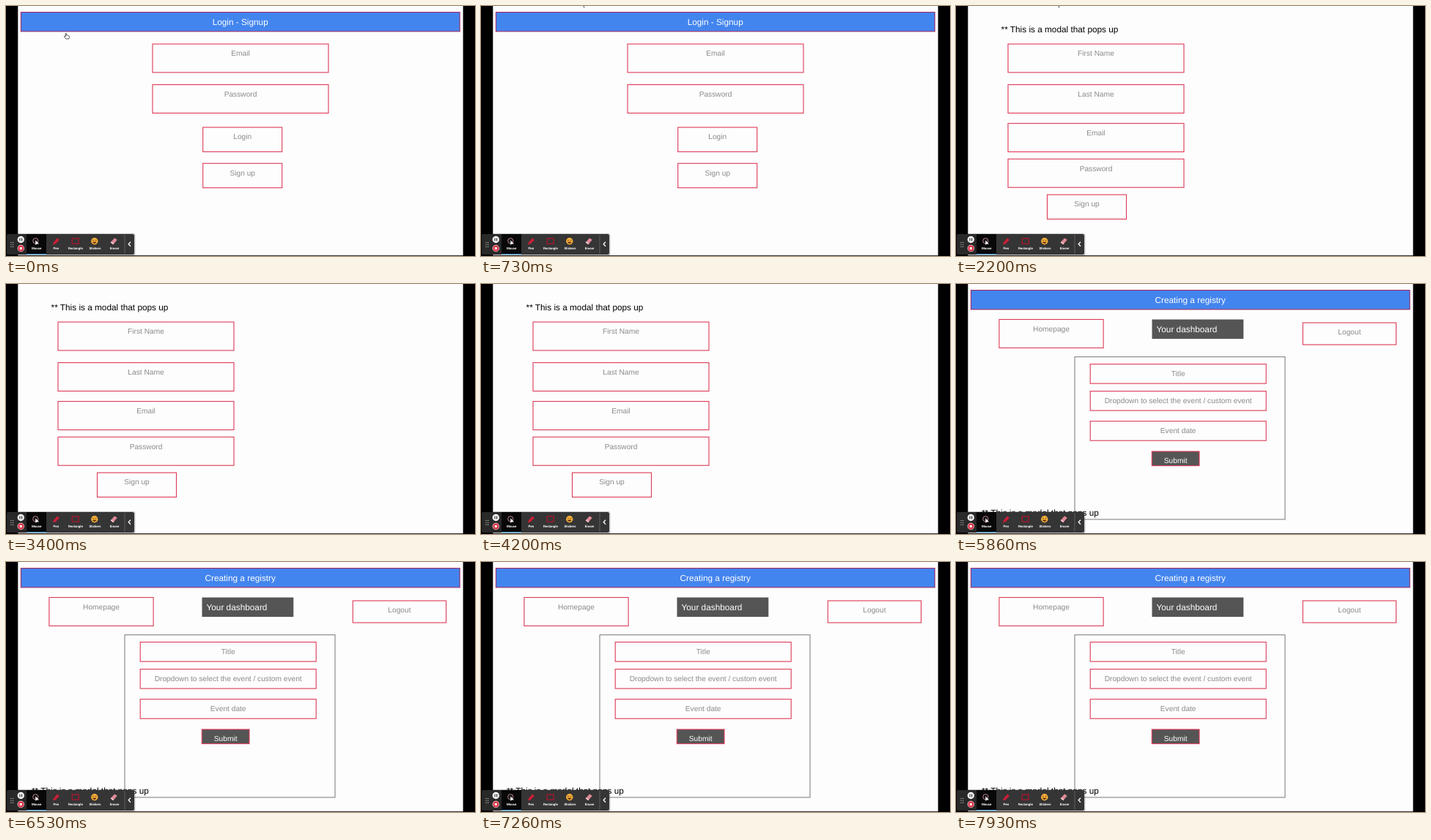
These frames come from a looping animation (640 px wide and 342 px high, 8000 ms). An HTML page:

```html
<!DOCTYPE html>
<html lang="en">
<head>
<meta charset="utf-8">
<style>
html, body { margin: 0; width: 100%; height: 100%; overflow: hidden; background: #000; }
svg { display: block; width: 640px; height: 342px; font-family: "Liberation Sans", Arial, sans-serif; text-rendering: geometricPrecision; }
.box { fill: none; stroke: #dc3a57; stroke-width: 1.1; }
.label { font-size: 10.2px; fill: #8b8b8b; text-anchor: middle; }
.big { font-size: 11.8px; }
.tool { font: bold 4.4px Roboto, sans-serif; fill: #fff; text-anchor: middle; }
</style>
</head>
<body>
<svg viewBox="0 0 640 342">
  <rect x="16.3" width="607.4" height="341.2" fill="#fdfdfd"/>
  <g id="slides"></g>
  <g id="hand" fill="#fff" stroke="#333" stroke-width=".8" stroke-linejoin="round">
    <path d="M-1.8 1V-3.3Q-1.2 -4.3-.6 -3.3V-.9Q.4-1.6 1-.7 2-1.1 2.3-.3 3.4-.5 3.4.6V2.2L2.5 4H-1.2L-3.6.9Q-3.6-.3-2.5.3Z"/>
  </g>
  <path id="arrow" d="M136.5-9V.3L138.5-1.4 140.1 2.9 142 2.2 140.4-2H143.2Z" fill="#777" stroke="#fff" stroke-width=".6"/>

  <g id="toolbar">
    <rect x="0" y="311" width="176.5" height="31" rx="3" fill="#000" opacity=".22"/>
    <rect x="1" y="312" width="174" height="28" rx="2.5" fill="#353535"/>
    <path d="M3.5 312H28V340H3.5Q1 340 1 337.5V314.5Q1 312 3.5 312Z" fill="#292929"/>
    <path d="M28 312H55V340H28Z" fill="#080808"/>
    <path d="M28 339H55V340H28Z" fill="#3a9fdc"/>
    <path d="M7 323V330M9.6 323V330" stroke="#bbb" stroke-width="1.2" stroke-dasharray="1.2 1.7"/>
    <circle cx="20.3" cy="319.5" r="4.7" fill="#f4f4f4"/>
    <path d="M19 317.5V321.5M21.6 317.5V321.5" stroke="#222" stroke-width="1.1"/>
    <circle cx="20.3" cy="331.5" r="4.7" fill="#f1d5d8"/>
    <circle cx="20.3" cy="331.5" r="3.9" fill="#d92b40"/>
    <path d="M18.7 329.9h3.2v3.2h-3.2Z" fill="#fff"/>
    <circle cx="40.3" cy="321.3" r="3.6" fill="none" stroke="#d99aa4" stroke-width=".9"/>
    <path d="M40.3 320.3V327L42 325.5H45Z" fill="#fff"/>
    <path d="M64 326.5 65 323.3 70 317.5 73 319.9 67.5 325.5Z" fill="#c91f38"/>
    <rect x="90.2" y="318" width="9" height="7.3" fill="none" stroke="#b3142e" stroke-width="1.2"/>
    <circle cx="120.8" cy="321.8" r="4.7" fill="#f3b13a"/>
    <path d="M118 320.5h2M121.6 320.5h2M118.4 323Q120.8 326.5 123.2 323Z" fill="#6b3512" stroke="#6b3512" stroke-width=".8"/>
    <path d="M142.7 323.5 148 317.6 151.8 319.7 146.3 326.2Z" fill="#e08a98"/>
    <path d="M142.7 323.5 143.8 322.3 147.4 324.9 146.3 326.2Z" fill="#f0c9cf"/>
    <path d="M162 313V339" stroke="#6a6a6a" stroke-width=".8"/>
    <path d="M170 322.7 167.2 325.7 170 328.7" fill="none" stroke="#fff" stroke-width="1.3"/>
  </g>
</svg>
<script>
const $ = id => document.getElementById(id);

const text = (s, x, y, cls = "label", style = "") =>
  `<text x="${x}" y="${y}" class="${cls}" style="${style}">${s}</text>`;
const rect = (x, y, w, h, attrs = 'class="box"') =>
  `<rect x="${x}" y="${y}" width="${w}" height="${h}" ${attrs}/>`;
// Outlined field with its label near the top
const field = (s, x, y, w, h, base = 16.2, cx = x + w / 2) =>
  rect(x, y, w, h) + text(s, cx, y + base);
const header = s =>
  rect(20.4, 8.5, 598.8, 26.3, 'class="box" style="fill:#4385ee;stroke:#9c2c68"') +
  text(s, 319.7, 25.8, "label big", "fill:#fff");
const note = (x, y) => text("** This is a modal that pops up", x, y, "big");

const common =
  field("Homepage", 58.9, 48.5, 142.2, 38.9, 16.1) +
  rect(267.5, 48.5, 124.8, 26.5, 'fill="#555"') +
  text("Your dashboard", 273.5, 66, "big", "fill:#fff") +
  field("Logout", 473.3, 53, 127.3, 30, 15.7);

const slides = [
  [0, header("Login - Signup") +
    field("Email", 200, 52, 240, 38.9) +
    field("Password", 200, 107.6, 240, 38.9) +
    field("Login", 268.7, 166, 108, 33.4) +
    field("Sign up", 268.7, 215.3, 108, 33.4)],
  [2200, note(61.6, 35.5) +
    field("First Name", 71, 52, 240, 38.9) +
    field("Last Name", 71, 107.6, 240, 38.9) +
    field("Email", 71, 160.6, 240, 38.9) +
    field("Password", 71, 209.3, 240, 38.9) +
    field("Sign up", 124.5, 258.1, 108, 33.4)],
  [4400, header("Dashboard") + common +
    field("Registry 1", 58.8, 107, 240, 38.9) +
    field("Registry 2", 58.8, 162.7, 240, 38.9) +
    field("Registry 3", 58.8, 215.7, 240, 38.9) +
    field("New Wish List", 449.9, 220, 127.3, 30, 15.9, 515)],
  [5800, header("Creating a registry") + common +
    rect(162, 99.7, 287, 222.3, 'fill="none" stroke="#777"') +
    field("Title", 183.2, 109.6, 240, 26.5) +
    field("Dropdown to select the event / custom event", 183.2, 146.6, 240, 26.5) +
    field("Event date", 183.2, 187.7, 240, 26.5) +
    rect(267.3, 229, 64.7, 19.6, 'class="box" style="fill:#555"') +
    text("Submit", 299.7, 244.8, "label", "fill:#fff") +
    note(35, 316.5)]
];

$("slides").innerHTML = slides.map(s => `<g>${s[1]}</g>`).join("");
const groups = [...$("slides").children];

["Mouse", "Pen", "Rectangle", "Stickers", "Eraser"].forEach((s, i) =>
  $("toolbar").insertAdjacentHTML("beforeend", text(s, 41.7 + i * 26.6, 333, "tool")));

const show = (el, on) => el.style.display = on ? "" : "none";

function draw(now) {
  const t = now % 8000;
  const current = slides.filter(s => s[0] <= t).length - 1;
  groups.forEach((g, i) => show(g, i === current));

  // The pointer moves in eleven steps, then rests half outside the top edge
  const step = t < 60 ? 0 : Math.min(11, Math.floor((t - 60) / 67) + 1);
  const p = step / 11, e = p * p * (3 - 2 * p);
  $("hand").setAttribute("transform", `translate(${83 + 57 * e} ${41 - 43 * e})`);
  show($("hand"), step < 11);
  show($("arrow"), step === 11 && t < 2260);
  requestAnimationFrame(draw);
}
requestAnimationFrame(draw);
</script>
</body>
</html>
```
